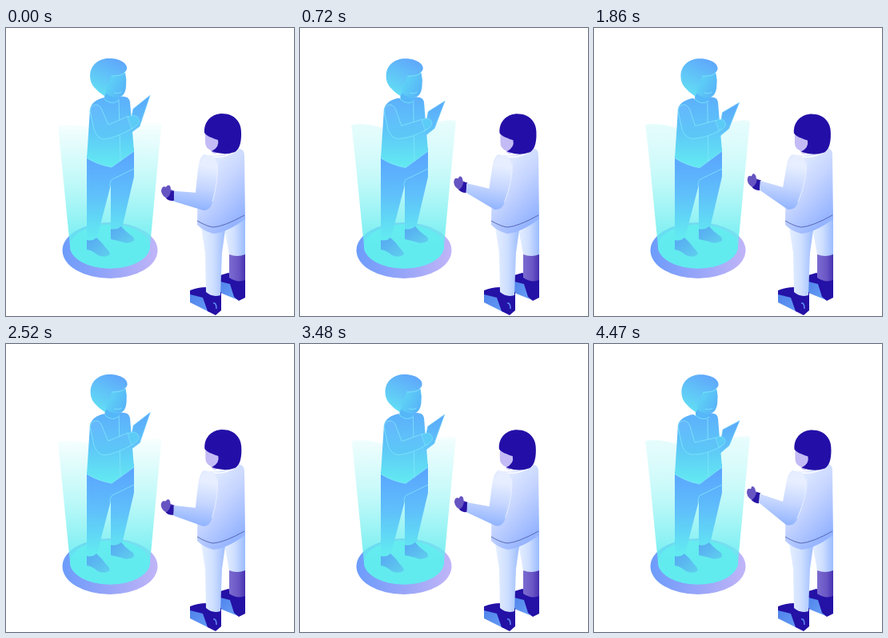
These frames come from a looping animation (360x360 px, 4500 ms). An HTML page:

```html
<!DOCTYPE html>
<html lang="en">
<head>
<meta charset="utf-8">
<title>Hologram meeting</title>
<style>
  html, body { margin: 0; width: 100%; height: 100%; overflow: hidden; background: #fff; }
  svg { display: block; width: 100vw; height: 100vh; }
  .seam { fill: none; stroke: #83e6fb; stroke-width: .8; stroke-linejoin: round; stroke-linecap: round; }
</style>
</head>
<body>
<svg viewBox="0 0 360 360">
  <defs>
    <linearGradient id="rim">
      <stop offset="0" stop-color="#6c9cfb"/><stop offset=".5" stop-color="#98a5f8"/><stop offset="1" stop-color="#c0b5f8"/>
    </linearGradient>
    <linearGradient id="beam" gradientUnits="userSpaceOnUse" x1="0" y1="119" x2="0" y2="272">
      <stop offset="0" stop-color="#6ef0f0" stop-opacity=".05"/>
      <stop offset=".5" stop-color="#6ef0f0" stop-opacity=".45"/>
      <stop offset="1" stop-color="#62ebef" stop-opacity=".9"/>
    </linearGradient>
    <linearGradient id="cap" gradientUnits="userSpaceOnUse" x1="0" y1="116" x2="0" y2="180">
      <stop offset="0" stop-color="#a6f4f6" stop-opacity=".24"/>
      <stop offset="1" stop-color="#a6f4f6" stop-opacity="0"/>
    </linearGradient>
    <linearGradient id="trousers" gradientUnits="userSpaceOnUse" x1="0" y1="160" x2="0" y2="262">
      <stop offset="0" stop-color="#5aa6fe"/><stop offset=".45" stop-color="#5fbefb"/><stop offset="1" stop-color="#62eaf1"/>
    </linearGradient>
    <linearGradient id="shirt" gradientUnits="userSpaceOnUse" x1="0" y1="84" x2="0" y2="172">
      <stop offset="0" stop-color="#5caefb"/><stop offset=".5" stop-color="#5ec6f8"/><stop offset="1" stop-color="#62e9f1"/>
    </linearGradient>
    <linearGradient id="sleeve" gradientUnits="userSpaceOnUse" x1="0" y1="95" x2="0" y2="140">
      <stop offset="0" stop-color="#66b6fd"/><stop offset="1" stop-color="#5acaf6"/>
    </linearGradient>
    <linearGradient id="hair" x1=".75" y1="0" x2=".3" y2="1">
      <stop offset="0" stop-color="#5fa6fb"/><stop offset="1" stop-color="#62dff4"/>
    </linearGradient>
    <linearGradient id="face" x2="1" y2=".5">
      <stop offset="0" stop-color="#60dcf4"/><stop offset="1" stop-color="#58b6f8"/>
    </linearGradient>
    <linearGradient id="tablet" x2="0" y2="1">
      <stop offset="0" stop-color="#5aa8fb"/><stop offset="1" stop-color="#60c8f8"/>
    </linearGradient>
    <linearGradient id="shoe" x2="1" y2="1">
      <stop offset="0" stop-color="#57a6f2"/><stop offset="1" stop-color="#5fd0ee"/>
    </linearGradient>
    <linearGradient id="coat" gradientUnits="userSpaceOnUse" x1="246" y1="172" x2="304" y2="226">
      <stop offset="0" stop-color="#e2ebff"/><stop offset=".45" stop-color="#c6d5ff"/><stop offset="1" stop-color="#94b3ff"/>
    </linearGradient>
    <linearGradient id="arm" gradientUnits="userSpaceOnUse" x1="244" y1="172" x2="236" y2="226">
      <stop offset="0" stop-color="#e6eeff"/><stop offset=".5" stop-color="#c4d5ff"/><stop offset="1" stop-color="#90b3ff"/>
    </linearGradient>
    <linearGradient id="leg">
      <stop offset="0" stop-color="#e6f0ff"/><stop offset=".5" stop-color="#cfdfff"/><stop offset="1" stop-color="#9bbcff"/>
    </linearGradient>
    <linearGradient id="calf">
      <stop offset="0" stop-color="#7c6cd0"/><stop offset=".6" stop-color="#6955c4"/><stop offset="1" stop-color="#4632b2"/>
    </linearGradient>
    <linearGradient id="boot" x2="1" y2="1">
      <stop offset="0" stop-color="#4f82ea"/><stop offset="1" stop-color="#6aa3f8"/>
    </linearGradient>
  </defs>

  <!-- platform and light -->
  <ellipse cx="130" cy="278" rx="59.5" ry="35" fill="url(#rim)"/>
  <ellipse cx="130" cy="273" rx="50" ry="27.5" fill="#62e9ef"/>
  <path fill="url(#beam)" d="M65 122Q82 119 103 124H160Q178 117 194.5 119L180 273A50 27.5 0 0 1 80 273Z"/>
  <path id="glow" fill="url(#cap)" d="M64 121Q82 117 103 126V190H71ZM158 123Q178 113 195 116L188 190H158Z"/>

  <!-- hologram -->
  <path fill="url(#trousers)" d="M101 160L160 150V186L145 250Q138 253 131 250V196L118 246L113 265Q107 268 101 266Z"/>
  <path class="seam" d="M160 176L133 189Q130 191 130 197"/>
  <path fill="url(#shoe)" d="M101 265Q108 267 113 262Q119 267 124 274Q130 280 130 283Q124 288 115 284Q108 278 101 277Z"/>
  <path fill="url(#shoe)" d="M131 251Q138 253 144 248Q150 255 156 259Q161 262 160 266Q152 271 144 267L131 264Z"/>
  <path id="torso" fill="url(#shirt)"/>
  <path id="hem" class="seam"/>
  <path id="zip" class="seam"/>
  <path id="tab" fill="url(#tablet)" stroke="#69cffa" stroke-width=".6"/>
  <path id="sleeveShape" fill="url(#sleeve)" stroke="#83e6fb" stroke-width=".8"/>
  <path id="fist" fill="#5ccbf6" stroke="#83e6fb" stroke-width=".6"/>
  <g id="manHead">
    <path fill="#55b7f8" d="M123 78H140V92Q132 97 123 91Z"/>
    <path class="seam" d="M123 89Q132 97 140 91"/>
    <path fill="url(#face)" d="M123 60Q136 54 149 56Q151 64 150 73Q149 86 139 87Q128 86 123 79Z"/>
    <path fill="url(#hair)" d="M105 60C105 46 116 38 129 38C142 38 152 44 151 51Q149 59 132 60Q129 64 130 69Q124 69 125 76Q126 82 123 85Q116 81 110 74Q105 68 105 60Z"/>
    <path class="seam" d="M132 60Q144 60 149 56M135 81Q140 83 144 80"/>
  </g>

  <!-- visitor -->
  <path fill="url(#boot)" d="M268 315L282 318L290 340L268 331Z"/>
  <path fill="#2411a6" d="M268 309L278 306Q289 314 299 311V337L291 341L285 336L280 320L268 317Z"/>
  <path fill="url(#calf)" d="M279 281H299V315Q289 319 279 312Z"/>
  <path fill="url(#leg)" d="M272 245L299 232V283Q289 287 279 283Z"/>
  <path fill="url(#boot)" d="M230 332L247 335L254 355L262 359L230 343Z"/>
  <path fill="#2411a6" d="M230 328Q240 324 250 324Q259 334 269 330V353L262 359L252 354L246 337L230 333Z"/>
  <path fill="none" stroke="#5d86ee" stroke-width="1.6" d="M259 344Q263 343 263 351"/>
  <path fill="url(#leg)" d="M243 243L275 246L270 281L268 334Q258 337 250 330L249 281Z"/>
  <path id="coatShape" fill="url(#coat)"/>
  <path fill="none" stroke="#4655a8" stroke-width=".8" d="M239 241Q251 248 259 249Q273 248 298 234"/>
  <path id="collar" fill="none" stroke="#fff" stroke-width="1.4"/>
  <path id="hand" fill="#6654c2"/>
  <path id="cuff" fill="#2814a5"/>
  <path id="armShape" fill="url(#arm)"/>
  <path id="fold" fill="none" stroke="#eef3ff" stroke-width=".8"/>
  <g id="womanHead">
    <path fill="#c3bbf5" d="M249 130L264 130L268 150L262 157Q257 157 256 153Q249 150 249 143Z"/>
    <path fill="#230fa7" d="M248 131C247 115 259 107 270 107C286 107 295 118 294 133C294 145 291 152 286 155Q272 160 257 154Q267 149 265 140Q261 139 257 137Q251 135 248 131Z"/>
  </g>
</svg>
<script>
  const LOOP = 4500, SWAY = 3000, LEAD = 120, FLICKER = 1250;
  const el = id => document.getElementById(id);
  const wave = (t, period) => (1 - Math.cos(2 * Math.PI * t / period)) / 2;

  // Each shape blends between its two end poses.
  const poses = {
    torso: ['M105 101Q108 90 123 87Q132 94 141 86Q153 84 155 92L160 154L132 174Q115 171 101 163Z',
            'M105 101Q108 91 124 88Q133 95 142 87Q154 85 155 93L160 154L132 175Q115 172 101 163Z'],
    hem: ['M102 163Q115 171 132 174L160 154', 'M102 163Q115 172 132 175L160 154'],
    zip: ['M141 89L143 166', 'M142 90L143 167'],
    tab: ['M159 101L180 84L167 123L152 134Z', 'M161 107L182 96L169 127L156 138Z'],
    sleeveShape: ['M105 103Q107 95 114 96Q119 98 121 105L128 121L153 110L160 124Q139 137 123 139Q115 139 110 127Z',
                  'M105 103Q107 95 114 96Q119 98 121 106L126 123L153 117L159 128Q139 139 122 138Q114 137 110 127Z'],
    fist: ['M152 112Q158 107 164 111Q169 116 164 121L157 126Z', 'M152 118Q157 114 162 117Q166 121 162 126L156 129Z'],
    coatShape: ['M247 158Q268 163 291 151Q298 151 298 160L299 239Q275 256 259 257Q247 254 239 246L240 180Q241 162 247 158Z',
                'M248 158Q268 163 292 150Q299 151 298 160L299 239Q275 256 259 257Q247 254 239 246L240 180Q241 162 248 158Z'],
    collar: ['M252 160Q272 165 290 152', 'M254 160Q274 165 292 152'],
    hand: ['M210 204L206 202Q206 196 202 197L200 199Q195 197 194 204Q195 211 203 214L209 214Z',
           'M207 186L202 184Q201 177 197 178L196 181Q191 179 191 186Q192 193 200 196L206 196Z'],
    cuff: ['M206 204L211 204L210 216Q204 217 200 213Q205 211 206 204Z',
           'M203 185L208 186L206 199Q201 199 197 195Q202 192 203 185Z'],
    armShape: ['M210 204L237 206L240 176Q244 158 257 159Q266 164 264 184L259 214Q257 228 247 228L210 217Z',
               'M207 187L236 197L240 176Q244 158 258 159Q267 164 265 184L255 216Q251 229 240 226L206 198Z'],
    fold: ['M264 168Q266 190 258 217', 'M266 168Q267 190 254 218']
  };
  const NUM = /[\d.]+/g;
  const shapes = Object.entries(poses).map(([id, [from, to]]) =>
    ({ node: el(id), from, to: to.match(NUM).map(Number) }));

  function blend({ from, to }, p) {
    let i = 0;
    return from.replace(NUM, n => (+n + (to[i++] - n) * p).toFixed(2));
  }

  function draw(now) {
    const t = now % LOOP, p = wave(t + LEAD, SWAY);
    for (const s of shapes) s.node.setAttribute('d', blend(s, p));
    el('manHead').setAttribute('transform', `translate(${4 * p} ${.3 * p}) rotate(${.8 * p} 132 92)`);
    el('womanHead').setAttribute('transform', `translate(${2.5 * p} ${.6 * p})`);
    el('glow').setAttribute('opacity', wave(t, FLICKER));
    requestAnimationFrame(draw);
  }
  draw(0);
</script>
</body>
</html>
```
